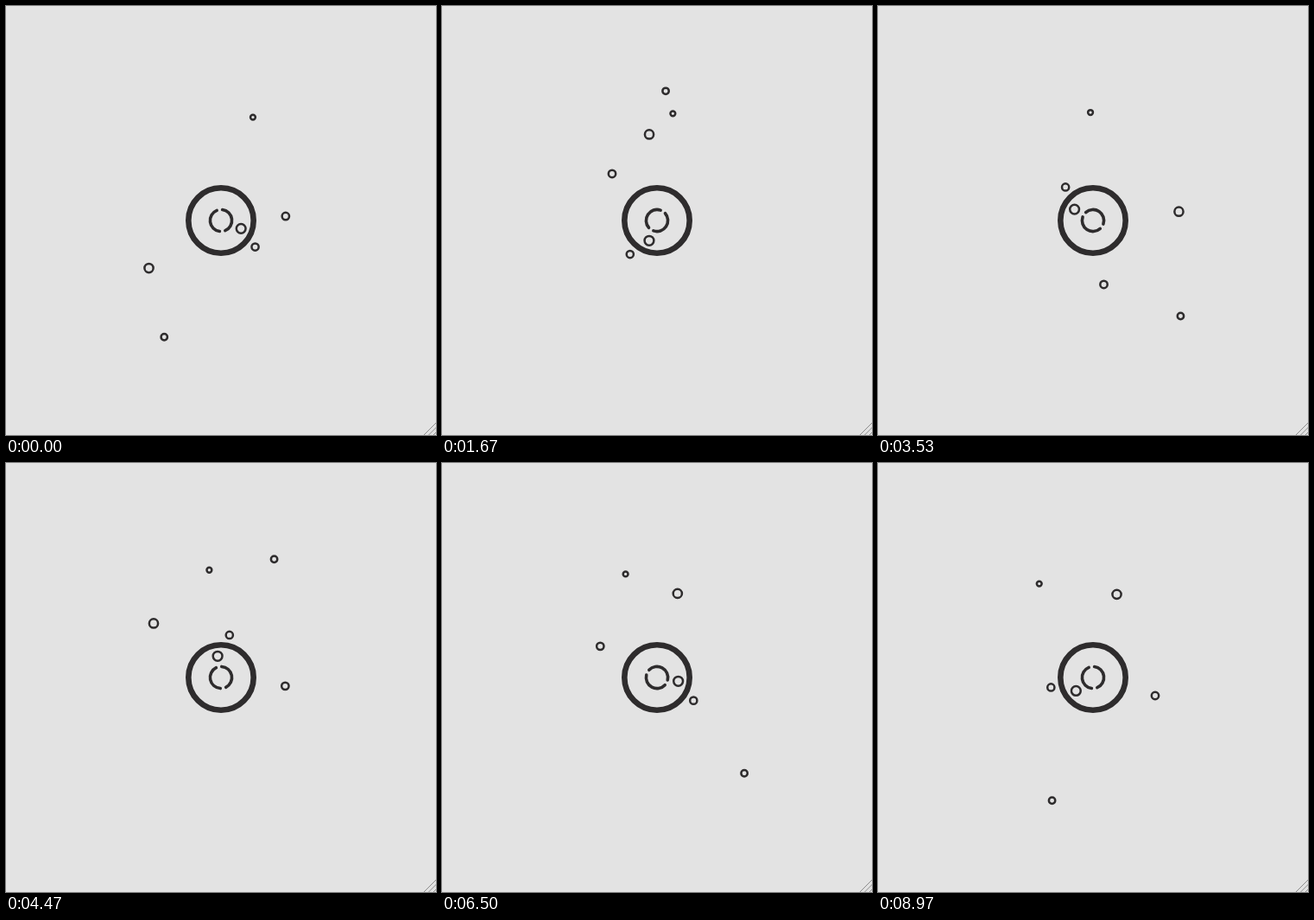
Write an HTML page that moves like this. It is 498 px wide and 496 px high and loops after 9010 ms.

```html
<!DOCTYPE html>
<html lang="en">
<head>
<meta charset="utf-8">
<title>Orbits</title>
<style>
  html, body { margin: 0; width: 100%; height: 100%; overflow: hidden; background: #e3e3e3; }
  svg { display: block; width: 498px; height: 496px; }
  #system { fill: none; stroke: #2e2c2d; stroke-width: 2.5; }
  #core { stroke-width: 3.6; stroke-linecap: round; }
  #grip { fill: none; stroke: #8c8c8c; }
</style>
</head>
<body>
<svg viewBox="0 0 498 496">
  <g id="system" transform="translate(249 248)">
    <circle r="37.7" stroke-width="6.6"/>
    <g id="core"></g>
  </g>
  <g id="grip"></g>
</svg>
<script>
const LOOP = 9010, LAST = 269, ORBIT_GAP = 25;
const [system, core, grip] = ['system', 'core', 'grip'].map(id => document.getElementById(id));
const rad = deg => deg * Math.PI / 180;

function add(parent, tag, attrs) {
  const el = document.createElementNS('http://www.w3.org/2000/svg', tag);
  for (const key in attrs) el.setAttribute(key, attrs[key]);
  return parent.appendChild(el);
}

// Two opposite arcs, each reaching 75 degrees to either side of its middle.
const R = 12.6, ax = R * Math.sin(rad(75)), ay = R * Math.cos(rad(75));
for (const turn of [0, 180]) {
  add(core, 'path', {
    d: `M${-ax} ${-ay}A${R} ${R} 0 0 1 ${ax} ${-ay}`,
    transform: `rotate(${turn})`
  });
}

for (let x = 483.5; x < 498; x += 5.5) {
  add(grip, 'path', { d: `M${x} 496.5L498.5 ${x - 2}` });
}

// One moon per orbit, from the inside out; speed is in degrees per step.
const moons = [
  { r: 5.4, start: 22, speed: 1.784 },
  { r: 4.1, start: 37.7, speed: 1.818 },
  { r: 4.2, start: -3.8, speed: -2.602 },
  { r: 5.1, start: 146.6, speed: -4.835 },
  { r: 2.9, start: -72.8, speed: -0.175 },
  { r: 3.7, start: 116, speed: -4.043 }
];
moons.forEach((moon, i) => {
  moon.orbit = ORBIT_GAP * (i + 1);
  moon.el = add(system, 'circle', { r: moon.r });
});

function draw(now) {
  // Thirty steps a second, on a 10 ms clock.
  const t = Math.floor((now % LOOP) / 10) * 10;
  const step = Math.min(LAST, Math.floor((t + 5) * 0.03));
  // The core makes six whole turns per loop.
  core.setAttribute('transform', `rotate(${82.5 + 6 * 360 * step / LAST})`);
  for (const { el, orbit, start, speed } of moons) {
    const angle = rad(start + speed * step);
    el.setAttribute('cx', orbit * Math.cos(angle));
    el.setAttribute('cy', orbit * Math.sin(angle));
  }
}

const begin = performance.now();
function tick() {
  draw(performance.now() - begin);
  requestAnimationFrame(tick);
}
tick();
</script>
</body>
</html>
```
